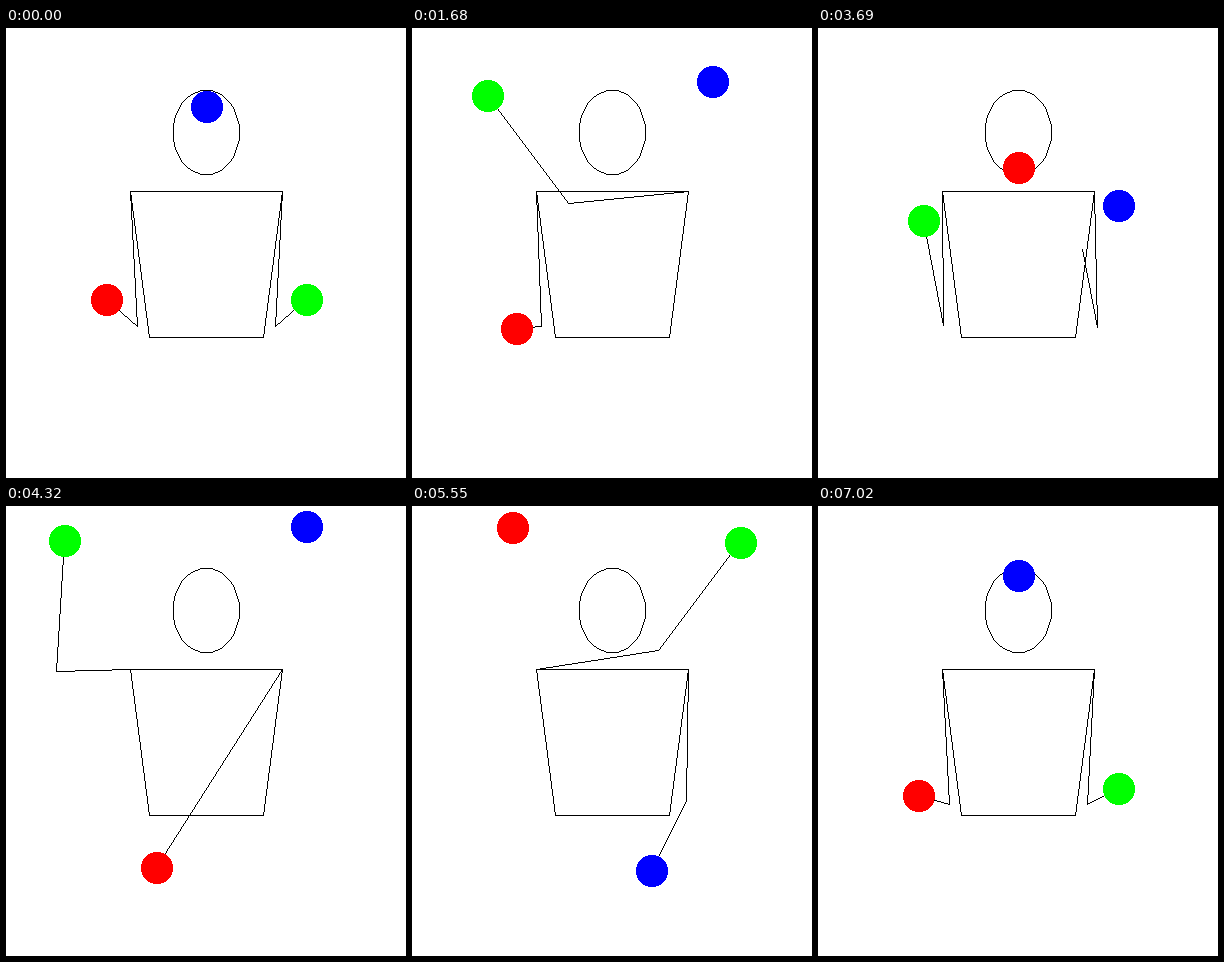
Recreate the animation shown at these times as an HTML page with a canvas. Size 400x450 px, loop 7050 ms.

```html
<!DOCTYPE html>
<html>
<head>
<meta charset="utf-8">
<style>
  html, body { margin: 0; width: 100%; height: 100%; overflow: hidden; background: #fff; }
  canvas { display: block; }
</style>
</head>
<body>
<canvas id="stage" width="400" height="450"></canvas>
<script>
const ctx = document.getElementById('stage').getContext('2d');
const BEATS = 12, BPS = 3.4, FRAMES = 235, FRAME_MS = 30, G = 980;
const EMPTY = 0.7, HIGH = 2.7;             // beats with an empty hand, beats of a high throw
const SIDE = 30, TOP = 60, DEPTH = 30;     // cm
const SHOULDER = 40, ARM = 41, RADIUS = 16;
const SCALE = 3.32, TILT = Math.PI / 15;

const wrap = u => (u + BEATS) % BEATS;
const mirror = p => ({ x: -p.x, z: p.z });
const launch = (z0, beats) => G * beats / BPS / 2 - z0 * BPS / beats;

// Free fall from height z0 back to 0 within the given beats
function flight(x, beat, beats, z0 = 0) {
  const t = beat / BPS;
  return { x, z: z0 + launch(z0, beats) * t - G / 2 * t * t };
}

// The right hand alternates throw and catch points; the first four carry the held ball around
const columns = [1, 1, 1, -1, -1, 1, 1, 0, -1, 1, 0, 1];
const count = columns.length;
const knots = columns.map((c, i) => ({
  beat: i + (i % 2 ? EMPTY - 1 : 0),
  h: (i % 2 ? 2 - EMPTY : EMPTY) / BPS,
  x: c * SIDE, z: i > 0 && i < 5 ? TOP : 0,
  vx: 0, vz: 0
}));

// Relax a free slope towards continuous acceleration
function relax(i, p, v) {
  const a = knots[(i + count - 1) % count], k = knots[i], b = knots[(i + 1) % count];
  const pull = 3 * ((k[p] - a[p]) / a.h ** 2 + (b[p] - k[p]) / k.h ** 2);
  k[v] = (pull - a[v] / a.h - b[v] / k.h) / (2 / a.h + 2 / k.h);
}
for (let pass = 0; pass < 40; pass++) {
  knots.forEach((k, i) => {
    const held = i < 4;
    if (held) relax(i, 'x', 'vx');
    if (held || i % 2) relax(i, 'z', 'vz');
    else k.vz = launch(k.z, k.z ? EMPTY : HIGH);
  });
}

function hermite(a, b, va, vb, h, s) {
  const r = 1 - s;
  return a * r * r * (1 + 2 * s) + b * s * s * (3 - 2 * s) + h * s * r * (va * r - vb * s);
}

function rightHand(u) {
  u = wrap(u);
  const i = knots.findLastIndex(k => k.beat <= u);
  const a = knots[i], b = knots[(i + 1) % count], s = (u - a.beat) / BPS / a.h;
  return {
    x: hermite(a.x, b.x, a.vx, b.vx, a.h, s),
    z: hermite(a.z, b.z, a.vz, b.vz, a.h, s)
  };
}
const leftHand = u => mirror(rightHand(u + 6));

// Thrown left, centre, left; the middle throw is caught by the right hand
function redBall(u) {
  u = wrap(u);
  const middle = Math.floor(u / 4) === 1;
  if (u % 4 < HIGH) return flight(middle ? 0 : -SIDE, u % 4, HIGH);
  return middle ? rightHand(u) : leftHand(u);
}
const blueBall = u => mirror(redBall(u + 6));

// Carried over the top to the other side and dropped there
function greenBall(u) {
  if (u >= 6) return mirror(greenBall(u - 6));
  if (u < 4) return rightHand(u);
  return u < 4 + EMPTY ? flight(-SIDE, u - 4, EMPTY, TOP) : leftHand(u);
}

const screenY = (z, y) =>
  163 - SCALE * ((z - SHOULDER) * Math.cos(TILT) + y * Math.sin(TILT));
const at = (x, y, z) => [Math.floor(200.4 + SCALE * x), Math.floor(screenY(z, y))];

// One-pixel line without smoothing
function line([x, y], [x1, y1]) {
  const n = Math.max(Math.abs(x1 - x), Math.abs(y1 - y), 1);
  for (let i = 0; i <= n; i++) {
    ctx.fillRect(x + Math.round((x1 - x) * i / n), y + Math.round((y1 - y) * i / n), 1, 1);
  }
}
const polyline = points => points.slice(1).forEach((p, i) => line(points[i], p));

function drawBall(color, p) {
  const cx = Math.round(200.95 + SCALE * p.x), cy = Math.floor(screenY(p.z, DEPTH));
  ctx.fillStyle = color;
  for (let dy = -RADIUS; dy < RADIUS; dy++) {
    const w = Math.round(Math.sqrt(RADIUS ** 2 - (dy + 0.5) ** 2));
    ctx.fillRect(cx - w, cy + dy, 2 * w, 1);
  }
}

// Two equal arm segments; the elbow hangs below the shoulder-hand line
function drawArm(side, hand) {
  const sx = side * 23, dx = hand.x - sx, dz = hand.z - SHOULDER;
  const d = Math.hypot(dx, DEPTH, dz);
  const drop = Math.sqrt(Math.max(0, ARM * ARM - d * d / 4));
  const slope = Math.asin(dz / d);
  const k = 0.5 + drop * Math.tan(slope) / d;
  polyline([
    at(sx, 0, SHOULDER),
    at(sx + dx * k, DEPTH * k, SHOULDER + dz / 2 - drop * Math.cos(slope)),
    at(hand.x, DEPTH, hand.z + 0.3)
  ]);
}

const body = [[-23, 40], [23, 40], [17.1, -5], [-17.1, -5], [-23, 40]].map(([x, z]) => at(x, 0, z));
const head = Array.from({ length: 41 }, (_, i) => {
  const a = i * Math.PI / 20;
  return at(10 * Math.cos(a), 0, 58 + 13 * Math.sin(a));
});

function draw() {
  const frame = Math.floor(performance.now() / FRAME_MS) % FRAMES;
  const u = frame / FRAMES * BEATS;
  ctx.fillStyle = '#fff';
  ctx.fillRect(0, 0, 400, 450);
  ctx.fillStyle = '#000';
  polyline(body);
  polyline(head);
  drawArm(-1, leftHand(u));
  drawArm(1, rightHand(u));
  drawBall('#f00', redBall(u));
  drawBall('#0f0', greenBall(u));
  drawBall('#00f', blueBall(u));
  requestAnimationFrame(draw);
}
draw();
</script>
</body>
</html>
```
